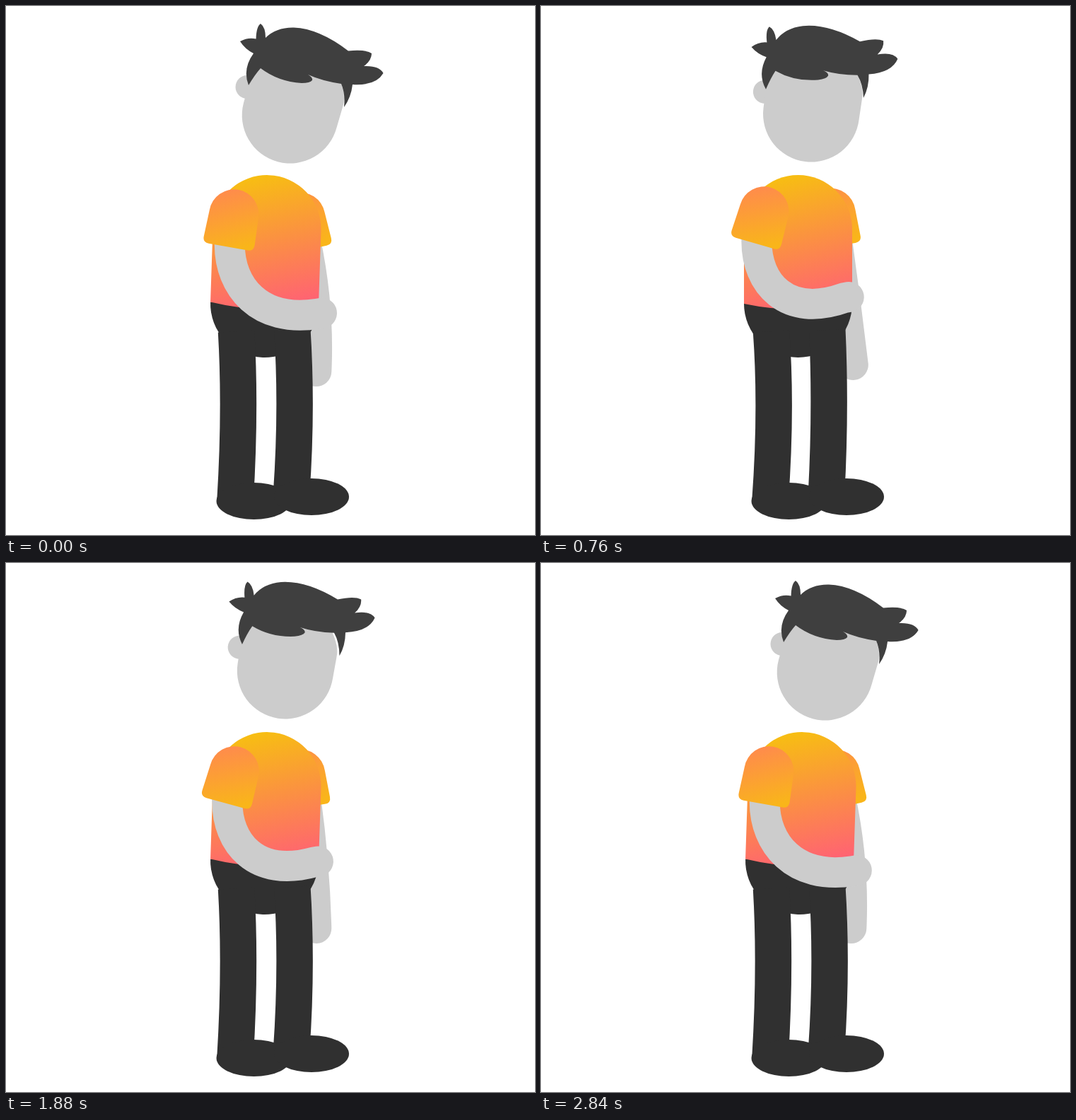
Recreate the animation shown at these times as an HTML page. Size 748 px wide and 748 px high, loop 2.88 s.

```html
<!DOCTYPE html>
<html lang="en">
<head>
<meta charset="utf-8">
<title>Standing figure</title>
<style>
  html, body { margin: 0; width: 100%; height: 100%; overflow: hidden; background: #fff; }
  svg { display: block; width: 100%; height: 100%; }
  .skin { fill: #ccc; }
  .hair { fill: #3f3f3f; }
  .dark { fill: #303030; }
  .limb { fill: none; stroke: #ccc; stroke-width: 43; stroke-linecap: round; }
  .leg { fill: none; stroke: #303030; stroke-width: 51.5; }
</style>
</head>
<body>
<svg viewBox="0 0 748 748">
  <defs>
    <linearGradient id="shirtFill" gradientUnits="userSpaceOnUse" x1="340" y1="238" x2="386" y2="423">
      <stop offset="0" stop-color="#f7c010"/>
      <stop offset="1" stop-color="#ff6372"/>
    </linearGradient>
    <linearGradient id="sleeveFill" gradientUnits="userSpaceOnUse" x1="-22" y1="-36" x2="16" y2="46">
      <stop offset="0" stop-color="#ff8850"/>
      <stop offset="1" stop-color="#f9b51a"/>
    </linearGradient>
    <!-- The shoulder joint is the local origin. -->
    <path id="sleeve" fill="url(#sleeveFill)"
      d="M-35 0A35 35 0 0 1 35 0L36.5 38Q36.8 47 28 47H-28Q-36.8 47 -36.5 38Z"/>
  </defs>

  <path id="backArm" class="limb"/>
  <use id="backSleeve" href="#sleeve"/>

  <g id="body">
    <path class="dark" d="M287 421H440A76.5 76 0 0 1 287 421Z"/>
    <path fill="url(#shirtFill)" d="M287 421V315.5A76.5 76.5 0 0 1 440 315.5V421Q363.5 437 287 421Z"/>
  </g>

  <path id="leftLeg" class="leg"/>
  <path id="rightLeg" class="leg"/>
  <ellipse class="dark" cx="350.5" cy="700" rx="53" ry="26"/>
  <ellipse class="dark" cx="432" cy="694" rx="53" ry="26"/>

  <path id="frontArm" class="limb"/>
  <use id="frontSleeve" href="#sleeve"/>

  <g id="head">
    <circle class="skin" cx="341" cy="114.5" r="16.5"/>
    <path class="skin" d="M336 137A68 68 0 0 0 467.5 172L476 143Q481 128 473 106L400 70L350 86Z"/>
    <path id="hair" class="hair" d="M343 112Q334 89 350 67Q338 61 331 50Q342 44 353.5 46.5
      Q354 29 360 25Q367 30 367 45Q382 30 407 30.5Q443 32 484 63.5Q508 61 517 67
      Q517 77 506 85Q528 84 533.5 95Q523 113 490 111Q488 129 478 143Q480 124 474 110
      Q447 106 427 97Q434 101 433 105Q430 109 418 109Q385 107 360 88Q352 97 343 112Z"/>
  </g>
</svg>
<script>
const LOOP = 2880;
const byId = id => document.getElementById(id);
const place = (id, x, y, angle = 0, pivot = '') =>
  byId(id).setAttribute('transform', `translate(${x} ${y}) rotate(${angle} ${pivot})`);
const trace = (id, path) => byId(id).setAttribute('d', path);

// Smooth 0 to 1 ramp between two times.
const ramp = (t, from, to) => {
  const p = Math.min(1, Math.max(0, (t - from) / (to - from)));
  return (1 - Math.cos(Math.PI * p)) / 2;
};

function draw(t) {
  // The upper body leans once per loop; head and arms sway twice.
  const rise = ramp(t, 320, 740);
  const lean = rise - ramp(t, 1290, 1760);
  const lift = rise - ramp(t, 1120, 1600);
  const phase = 4 * Math.PI * t / LOOP;
  const sway = 1 - Math.cos(phase);
  const sin = Math.sin(phase);
  const ripple = 1 - Math.cos(2 * phase);

  place('body', 0, 0, 1.9 * (1 - lean), '363.5 482');
  trace('leftLeg', `M325.5 460Q${332 + 1.5 * lean} 570 324 700`);
  trace('rightLeg', `M404.8 458Q${412 - 2 * lean} 570 403.5 690`);

  const nod = -6.3 * (sway / 2 + 0.13 * ripple + 0.08 * sin);
  place('head', -10.8 * lean, 0.6 * lean, nod - 1.7 * lean, '379 217.5');
  place('hair', 1.25 * ripple, 1.2 * lean - sway);

  // Far arm
  place('backSleeve', 416.2 - 6.5 * lean, 298.6 - 5.8 * lift, -12 + 2.5 * sway - 1.9 * lean);
  trace('backArm', `M${424 - 5 * lean} 335
    Q${443 - 5 * sway - 2 * lean} ${425 - 4 * lift} ${438.8 + 2.5 * lean} ${516.5 - 9 * lift}`);

  // Near arm
  const shoulderX = 322.3 - 7.7 * lean + 0.4 * sway;
  const shoulderY = 294.3 - 4 * lift;
  const angle = 10 + 4 * sway - 1.9 * lean;
  const cosA = Math.cos(angle * Math.PI / 180);
  const sinA = Math.sin(angle * Math.PI / 180);
  const cuffX = shoulderX + 1.7 * cosA - 44 * sinA;
  const cuffY = shoulderY + 1.7 * sinA + 44 * cosA;
  const handX = 446.5 - 4.2 * sway + 0.6 * sin - 2.8 * lean;
  const handY = 434.2 - 5.1 * sway - 3.6 * sin - 1.1 * ripple - 13.1 * lift;
  const sag = 14 + 5.1 * sway + 2.8 * sin + 7 * lift;
  place('frontSleeve', shoulderX, shoulderY, angle);
  trace('frontArm', `M${cuffX} ${cuffY - 12}V${cuffY}
    C${cuffX} ${cuffY + 58} ${handX - 89} ${handY + sag} ${handX - 6} ${handY + 1}
    L${handX} ${handY}`);
}

function tick() {
  draw(performance.now() % LOOP);
  requestAnimationFrame(tick);
}
tick();
</script>
</body>
</html>
```
